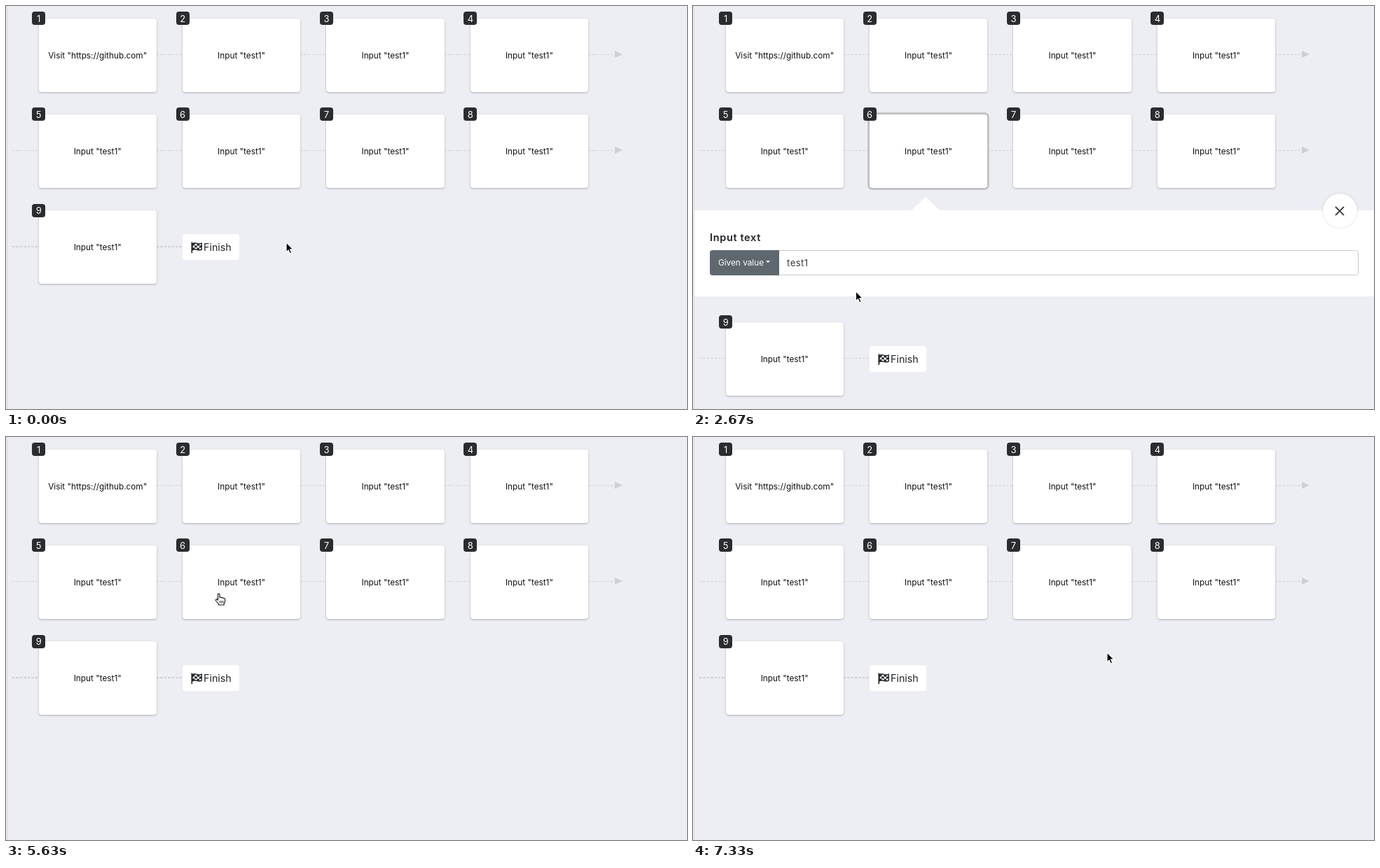
An HTML page for the animation above (7360 ms loop, 972 by 576 pixels).

```html
<!DOCTYPE html>
<html lang="en">
<head>
<meta charset="utf-8">
<title>Step editor</title>
<style>
html, body { margin: 0; width: 100%; height: 100%; overflow: hidden; }
body { background: #edeef3; color: #212529; font: 11.8px Inter, "Noto Sans", sans-serif; }
#stage { position: relative; width: 972px; height: 576px; overflow: hidden; }
#stage div, #stage svg { position: absolute; box-sizing: border-box; }
#edge { left: 0; top: 0; width: 1.5px; height: 576px; border-right: 1px solid #d9dbe0; }
.row { left: 0; width: 972px; height: 105px; }
.card, .finish, .badge, .button, .close { display: flex; align-items: center; justify-content: center; white-space: pre; }
.card { top: 0; width: 168.4px; height: 105px; padding-top: 1px; border-radius: 4px; background: #fff; color: #111; box-shadow: 0 1px 3px rgba(0,0,0,.27); }
.card.selected { box-shadow: 0 0 0 2.7px #bdbfc1; }
.badge { top: -9.3px; width: 19px; height: 19px; border-radius: 4px; background: #2b2c2f; color: #fff; font-size: 13px; }
.line { top: 51px; height: 1.6px; background: repeating-linear-gradient(90deg, #cfd1d6 0 3.4px, transparent 3.4px 5.4px); }
.arrow { left: 869px; top: 46.5px; border: solid transparent; border-width: 5.3px 0 5.3px 11.5px; border-left-color: #cdcfd3; }
.finish { left: 252px; top: 34px; width: 81.4px; height: 37.3px; border-radius: 4px; background: #fff; }
.finish span { position: absolute; left: 30px; font-size: 14.3px; }
.finish svg { left: 11.5px; top: 11px; }
#panel { left: 2px; width: 970px; height: 122.8px; background: #fff; }
#pointer { top: -19px; border: solid transparent; border-width: 0 20px 19.5px; border-bottom-color: #fff; }
.heading { left: 22px; top: 29.5px; line-height: 20px; font-size: 14.5px; font-weight: 600; letter-spacing: .65px; white-space: pre; }
.field { left: 120px; top: 57.5px; width: 827.5px; height: 35.5px; border: 1.2px solid #c8cbcf; border-radius: 0 4px 4px 0; padding-left: 11px; line-height: 35px; font-size: 13px; letter-spacing: .5px; color: #343a40; }
.button { left: 22px; top: 57.5px; width: 99px; height: 35.5px; padding-right: 10px; border-radius: 4px 0 0 4px; background: #5f686f; color: #fff; }
.button::after { content: ""; position: absolute; left: 80px; top: 15px; border: solid transparent; border-width: 3.6px 3.6px 0; border-top-color: #fff; }
#close { left: 896.5px; top: -23.7px; width: 49px; height: 49px; border-radius: 50%; background: #fff; box-shadow: 0 0 2.5px rgba(0,0,0,.2); }
#close.hover { background: #b5b5b5; }
#close svg { left: 17.5px; top: 18px; }
#cursor { left: 0; top: 0; overflow: visible; }
</style>
</head>
<body>
<div id="stage">
  <div id="edge"></div>
  <div id="panel">
    <div id="pointer"></div>
    <div class="heading">Input text</div>
    <div class="field">test1</div>
    <div class="button">Given value</div>
    <div id="close"><svg width="14" height="14" fill="none" stroke="#444" stroke-width="1.9"><path d="M1 1L13 13M13 1L1 13"/></svg></div>
  </div>
</div>
<script>
const LOOP = 7360, PITCH_X = 205.4, PITCH_Y = 137.25, SHIFT = 159.7;
const CARD_X = 46.5, CARD_W = 168.4, CARD_H = 105;

// Time and index of the open card (-1: none).
const clicks = [[0, -1], [1170, 1], [2200, 5], [3200, 8], [4500, -1], [5730, 5], [6970, -1]];

// Time and pointer hot spot.
const path = [
  [0, 400, 338], [30, 400, 338], [500, 339, 76], [730, 339, 76], [830, 341, 90],
  [1200, 341, 90], [1830, 337, 310], [1900, 321, 364], [2030, 321, 377],
  [2230, 321, 377], [2930, 165, 446], [3030, 149, 492], [3420, 149, 492],
  [3700, 193, 493], [4330, 921, 433], [4610, 921, 433], [5230, 440, 292],
  [5560, 304, 224], [5770, 304, 224], [6000, 658, 367], [6030, 661, 367],
  [6730, 905, 300], [6930, 905, 300], [7330, 591, 308], [7360, 591, 308]
];

const shapes = {
  arrow: '<path d="M0 0V13.6L3.1 10.8 5.3 15.8 7.7 14.8 5.5 9.9H9.8Z" stroke="#fff" stroke-width="1.1"/>',
  hand: '<path d="M-1.5 9V1C-1.5-.5 1-.5 1 1V6C1 4.6 3.4 4.6 3.4 6.2 3.6 5 5.8 5.2 5.8 6.8 6.2 5.8 8.6 6 8.6 8V11.5L7.2 14V16H-.5V14.5L-4.5 10C-5.5 8.3-3.5 7.2-2.6 8Z" fill="#fff" stroke="#111" stroke-width="1.1"/><path d="M1.6 10v3.5M3.7 10v3.5M5.8 10v3.5" stroke="#111" stroke-width=".9"/>',
  text: ['#fff" stroke-width="2.8', '#222" stroke-width="1.3'].map(ink =>
    `<path d="M-3.5-8Q0-8 0-5.5Q0-8 3.5-8M0-5.5V5.5M-3.5 8Q0 8 0 5.5Q0 8 3.5 8M-2 2.5H2" fill="none" stroke="${ink}"/>`).join('')
};

const flag = `<svg width="17" height="16" viewBox="0 0 17 16">
  <path d="M1.3 1V15.5" stroke="#212529" stroke-width="1.7" stroke-linecap="round"/>
  <path d="M2 2.6Q5 1 8.5 2.4T15.2 2.2V11Q12 12.6 8.7 11.3T2 11.6Z" fill="#fff" stroke="#212529" stroke-width="1.4"/>
  <path d="M2 2.6L5.3 1.9V5L8.6 5.6V2.4L11.9 2.8V5.7L15.2 5V8.1L11.9 8.8V11.8L8.6 11.3V8.5L5.3 8V11L2 11.6V8.8L5.3 8V5L2 5.7ZM8.6 5.6V8.5L11.9 8.8V5.7Z" fill="#212529" fill-rule="evenodd"/></svg>`;

const $ = id => document.getElementById(id);
const stage = $('stage'), panel = $('panel'), pointer = $('pointer'), close = $('close');

function add(parent, className, html = '', style = {}) {
  const el = document.createElement('div');
  el.className = className;
  el.innerHTML = html;
  Object.assign(el.style, style);
  return parent.appendChild(el);
}

function addLine(row, from, to) {
  add(row, 'line', '', { left: from + 'px', width: to - from + 'px' });
}

const cardX = i => CARD_X + i % 4 * PITCH_X;
const rowY = r => 17.5 + r * PITCH_Y;
const rows = [0, 1, 2].map(() => add(stage, 'row'));
const cards = [];

rows.forEach((row, r) => {
  if (r) addLine(row, 9, CARD_X);
  for (let i = r * 4; i < Math.min(9, r * 4 + 4); i++) {
    const x = cardX(i), end = x + CARD_W;
    addLine(row, end, i % 4 === 3 ? 869 : x + PITCH_X);
    cards.push(add(row, 'card', i ? 'Input "test1"' : 'Visit "https://github.com"', { left: x + 'px' }));
    add(row, 'badge', i + 1, { left: x - 9.3 + 'px' });
  }
  if (r < 2) add(row, 'arrow');
});
add(rows[2], 'finish', flag + '<span>Finish</span>');

stage.insertAdjacentHTML('beforeend', '<svg id="cursor" width="1" height="1"></svg>');
const cursor = $('cursor');

// Slope at a path point, limited so that the curve never overshoots.
function slope(i, axis) {
  if (!i || i === path.length - 1) return 0;
  const [a, b, c] = [path[i - 1], path[i], path[i + 1]];
  const before = (b[axis] - a[axis]) / (b[0] - a[0]);
  const after = (c[axis] - b[axis]) / (c[0] - b[0]);
  return before * after <= 0 ? 0 : 2 * before * after / (before + after);
}

function position(t, axis) {
  const i = path.findIndex((p, k) => k < path.length - 1 && t < path[k + 1][0]);
  const [a, b] = [path[i], path[i + 1]];
  const span = b[0] - a[0], u = (t - a[0]) / span, v = 1 - u;
  return a[axis] * v * v * (1 + 2 * u) + b[axis] * u * u * (3 - 2 * u)
    + span * u * v * (slope(i, axis) * v - slope(i + 1, axis) * u);
}

const inside = (x, y, left, top, w, h) => x >= left && x <= left + w && y >= top && y <= top + h;

let shownCard, shownShape;

function render(t) {
  const open = clicks.filter(c => c[0] <= t).pop()[1];
  const openRow = open < 0 ? 3 : Math.floor(open / 4);
  const panelY = rowY(openRow) + 137;
  const tops = rows.map((_, r) => rowY(r) + (r > openRow ? SHIFT : 0));
  const x = position(t, 1), y = position(t, 2);

  if (open !== shownCard) {
    shownCard = open;
    rows.forEach((row, r) => row.style.top = tops[r] + 'px');
    cards.forEach((card, i) => card.classList.toggle('selected', i === open));
    panel.style.display = open < 0 ? 'none' : 'block';
    panel.style.top = panelY + 'px';
    pointer.style.left = cardX(Math.max(open, 0)) + CARD_W / 2 - 26.5 + 'px';
  }

  const onClose = open >= 0 && Math.hypot(x - 923, y - panelY - 1) < 24.5;
  close.classList.toggle('hover', onClose);

  let shape = 'arrow';
  if (cards.some((_, i) => inside(x, y, cardX(i), tops[Math.floor(i / 4)], CARD_W, CARD_H))) shape = 'hand';
  else if (open >= 0 && !onClose) {
    if (inside(x, y, 123, panelY + 57.5, 826, 35.5)) shape = 'text';
    else if (inside(x, y, 24, panelY + 57.5, 99, 35.5)) shape = 'hand';
  }
  if (shape !== shownShape) {
    shownShape = shape;
    cursor.innerHTML = shapes[shape];
  }
  cursor.style.transform = `translate(${x}px, ${y}px)`;
}

const start = performance.now();
function tick() {
  render((performance.now() - start) % LOOP);
  requestAnimationFrame(tick);
}
tick();
</script>
</body>
</html>
```
